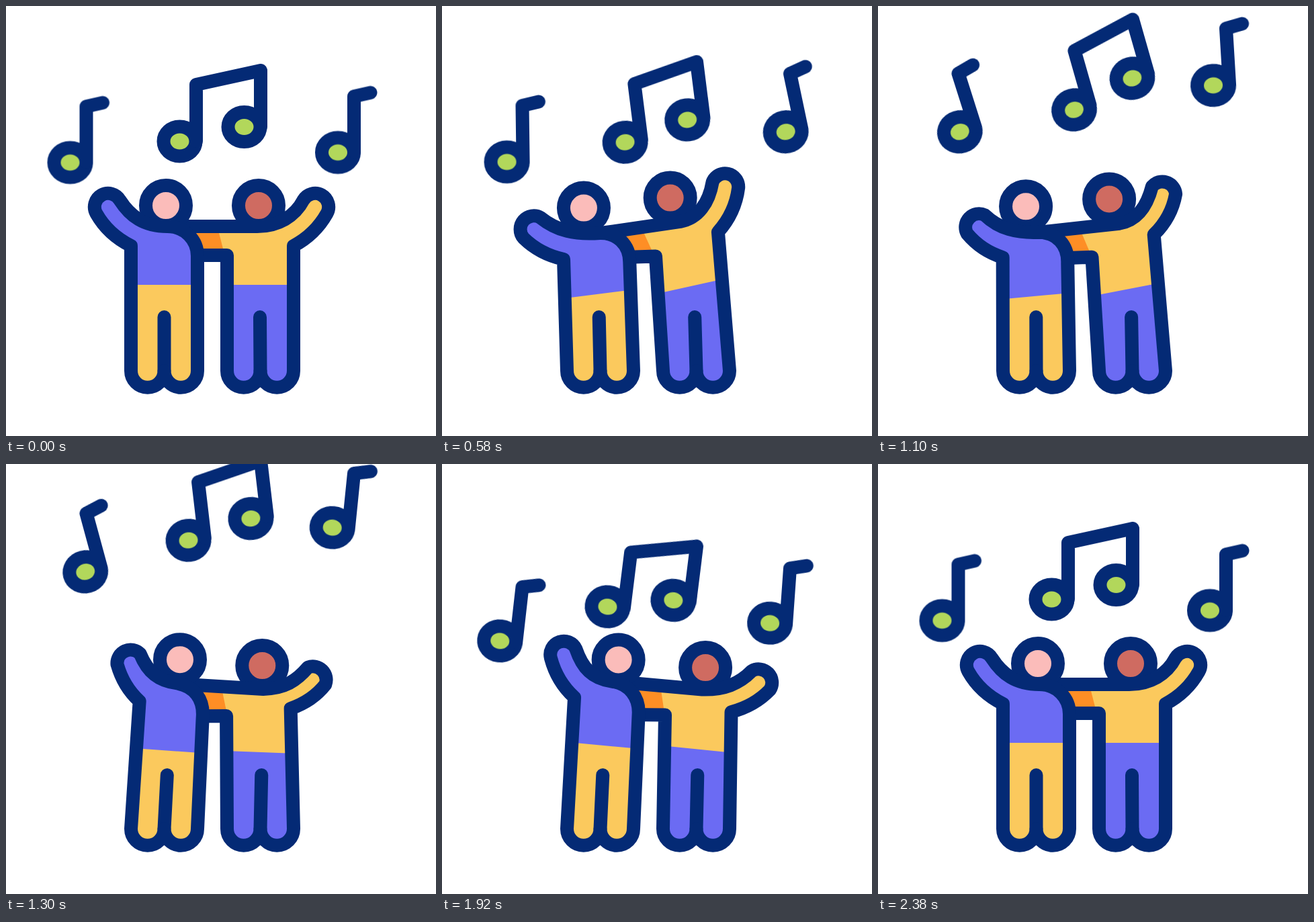
These frames come from a looping animation (640x640 px, 2.4 s). An HTML page:

```html
<!DOCTYPE html>
<html lang="en">
<head>
<meta charset="utf-8">
<title>Singing friends</title>
<style>
  html, body { margin: 0; width: 100%; height: 100%; overflow: hidden; background: #fff; }
  svg { display: block; width: 100%; height: 100%; }

  .line { fill: none; stroke: #042a75; stroke-width: 20; stroke-linecap: round; stroke-linejoin: round; }
  .purple { fill: #6b6bf3; }
  .yellow { fill: #fbc95d; }
  .orange { fill: #fe8e25; }
  .pink { fill: #fbbcba; }
  .brown { fill: #cf6b61; }
  .green { fill: #b2d75b; }

  .move { animation: 2.4s cubic-bezier(.3333, 0, .6667, 1) infinite; }

  /* People: rest, lean left, lean right, rest */
  .l-head { animation-name: l-head; }
  .l-body { animation-name: l-body; }
  .l-legs { animation-name: l-legs; }
  .l-gap  { animation-name: l-gap; }
  .r-head { animation-name: r-head; }
  .r-body { animation-name: r-body; }
  .r-legs { animation-name: r-legs; }
  .r-gap  { animation-name: r-gap; }
  .r-cuff { animation-name: r-cuff; }

  @keyframes l-head {
    0%, 95.8%, 100% { translate: 0 0; }
    37.5% { translate: -38px 5px; }
    64.4% { translate: 49px -11px; }
  }
  @keyframes l-body {
    0%, 95.8%, 100% { d: path("M186 543L186 357Q152 340 134.5 309A20 20 0 0 1 169.5 289C185 313 205 328 240 328C266 328 285 348 285 372L285 543A24.7 24.7 0 0 1 235.5 543A24.7 24.7 0 0 1 186 543Z"); }
    37.5% { d: path("M186 543L179 385Q143 381 116 360A20 20 0 0 1 138 326C165 343 195 346 233 342C258 341 277 358 277 385L285 543A24.7 24.7 0 0 1 235.5 543A24.7 24.7 0 0 1 186 543Z"); }
    64.4% { d: path("M186 543L208 338Q190 308 189 269A20 20 0 0 1 229 262C233 295 243 312 265 319C290 326 304 345 300 376L285 543A24.7 24.7 0 0 1 235.5 543A24.7 24.7 0 0 1 186 543Z"); }
  }
  @keyframes l-legs {
    0%, 95.8%, 100% { d: path("M186 415L285 415L285 543A24.7 24.7 0 0 1 235.5 543A24.7 24.7 0 0 1 186 543Z"); }
    37.5% { d: path("M182 443L278 426L285 543A24.7 24.7 0 0 1 235.5 543A24.7 24.7 0 0 1 186 543Z"); }
    64.4% { d: path("M200 414L294 432L285 543A24.7 24.7 0 0 1 235.5 543A24.7 24.7 0 0 1 186 543Z"); }
  }
  @keyframes l-gap {
    0%, 95.8%, 100% { d: path("M235.5 463L235.5 543"); }
    37.5% { d: path("M233 463L235.5 543"); }
    64.4% { d: path("M243 463L235.5 543"); }
  }
  @keyframes r-head {
    0%, 95.8%, 100% { translate: 0 0; }
    37.5% { translate: -51px -16px; }
    64.4% { translate: 32px 12px; }
  }
  @keyframes r-body {
    0%, 95.8%, 100% { d: path("M329 543L329 371L260 371L260 328L374 328C405 328 430 313 442.5 289A20 20 0 0 1 477.5 309Q460 340 428 357L428 543A24.7 24.7 0 0 1 378.5 543A24.7 24.7 0 0 1 329 543Z"); }
    37.5% { d: path("M329 543L313.5 373L255 376L235 341L347 318C372 311 384 285 386.5 251A20 20 0 0 1 426.5 255Q427 295 404 328L428 543A24.7 24.7 0 0 1 378.5 543A24.7 24.7 0 0 1 329 543Z"); }
    64.4% { d: path("M329 543L335 376L285 375L270 321L400 343C435 345 455 341 479.5 327A20 20 0 0 1 498.5 363Q470 380 433 381L428 543A24.7 24.7 0 0 1 378.5 543A24.7 24.7 0 0 1 329 543Z"); }
  }
  @keyframes r-legs {
    0%, 95.8%, 100% { d: path("M329 415L428 415L428 543A24.7 24.7 0 0 1 378.5 543A24.7 24.7 0 0 1 329 543Z"); }
    37.5% { d: path("M319 433L414 403L428 543A24.7 24.7 0 0 1 378.5 543A24.7 24.7 0 0 1 329 543Z"); }
    64.4% { d: path("M333 424L431 444L428 543A24.7 24.7 0 0 1 378.5 543A24.7 24.7 0 0 1 329 543Z"); }
  }
  @keyframes r-gap {
    0%, 95.8%, 100% { d: path("M378 463L378.5 543"); }
    37.5% { d: path("M375.5 463L378.5 543"); }
    64.4% { d: path("M382.5 463L378.5 543"); }
  }
  @keyframes r-cuff {
    0%, 95.8%, 100% { d: path("M260 328L314.5 328L325.5 371L260 371Z"); }
    37.5% { d: path("M235 341L289 329L313 374L255 376Z"); }
    64.4% { d: path("M270 321L335.6 333L337.4 376L285 375Z"); }
  }

  /* Notes: one copy sways up and goes, the next one drifts in from below */
  .l-out { animation-name: l-rise, l-sway, l-cut; }
  .c-out { animation-name: c-rise, c-sway, c-cut; }
  .r-out { animation-name: r-rise, r-sway, r-cut; }
  .l-in { animation-name: l-in; }
  .c-in { animation-name: c-in; }
  .r-in { animation-name: r-in; }

  @keyframes l-rise { 0%, 20.833% { translate: 0 0; } 80.833%, 100% { translate: 0 -130px; } }
  @keyframes c-rise { 0%, 12.5% { translate: 0 0; } 72.5%, 100% { translate: 0 -130px; } }
  @keyframes r-rise { 0%, 4.167% { translate: 0 0; } 64.167%, 100% { translate: 0 -130px; } }

  @keyframes l-sway { 0%, 20.833% { rotate: 0deg; } 48.333% { rotate: -18deg; } 78.333%, 100% { rotate: 10deg; } }
  @keyframes c-sway { 0%, 12.5% { rotate: 0deg; } 40% { rotate: -18.4deg; } 72.5%, 100% { rotate: 10.5deg; } }
  @keyframes r-sway { 0%, 4.167% { rotate: 0deg; } 31.667% { rotate: -14.5deg; } 61.667%, 100% { rotate: 9.5deg; } }

  @keyframes l-cut { 0%, 71.66% { opacity: 1; } 71.67%, 100% { opacity: 0; } }
  @keyframes c-cut { 0%, 66.66% { opacity: 1; } 66.67%, 100% { opacity: 0; } }
  @keyframes r-cut { 0%, 59.99% { opacity: 1; } 60%, 100% { opacity: 0; } }

  @keyframes l-in {
    0%, 66.66% { opacity: 0; translate: 0 52px; rotate: 10deg; }
    66.67% { opacity: 1; translate: 0 52px; rotate: 10deg; }
    100% { opacity: 1; translate: 0 0; rotate: 0deg; }
  }
  @keyframes c-in {
    0%, 61.66% { opacity: 0; translate: 0 50px; rotate: 13.3deg; }
    61.67% { opacity: 1; translate: 0 50px; rotate: 13.3deg; }
    100% { opacity: 1; translate: 0 0; rotate: 0deg; }
  }
  @keyframes r-in {
    0%, 54.99% { opacity: 0; translate: 0 50px; rotate: 9.8deg; }
    55% { opacity: 1; translate: 0 50px; rotate: 9.8deg; }
    100% { opacity: 1; translate: 0 0; rotate: 0deg; }
  }
</style>
</head>
<body>
<svg viewBox="0 0 640 640">
  <defs>
    <g id="bulb">
      <ellipse class="green" rx="24" ry="22"/>
      <ellipse class="line" rx="24" ry="22"/>
    </g>
    <g id="single">
      <use href="#bulb" x="-24" y="83.5"/>
      <path class="line" d="M0 83V0L24.5 -5.5"/>
    </g>
    <g id="pair">
      <use href="#bulb" x="-120.5" y="105.5"/>
      <use href="#bulb" x="-24.5" y="84"/>
      <path class="line" d="M-96 105V21L0 0V84"/>
    </g>
  </defs>

  <g class="move r-head">
    <circle class="brown" cx="376" cy="297" r="30"/>
    <circle class="line" cx="376" cy="297" r="30"/>
  </g>
  <path class="move r-body yellow"/>
  <path class="move r-cuff orange"/>
  <path class="move r-legs purple"/>
  <path class="move r-gap line"/>
  <path class="move r-body line"/>

  <g class="move l-head">
    <circle class="pink" cx="238" cy="297" r="30"/>
    <circle class="line" cx="238" cy="297" r="30"/>
  </g>
  <path class="move l-body purple"/>
  <path class="move l-legs yellow"/>
  <path class="move l-gap line"/>
  <path class="move l-body line"/>

  <g transform="translate(119.5 149.5)">
    <g class="move l-out"><use href="#single"/></g>
    <g class="move l-in"><use href="#single"/></g>
  </g>
  <g transform="translate(379 96)">
    <g class="move c-out"><use href="#pair"/></g>
    <g class="move c-in"><use href="#pair"/></g>
  </g>
  <g transform="translate(518 134.5)">
    <g class="move r-out"><use href="#single"/></g>
    <g class="move r-in"><use href="#single"/></g>
  </g>
</svg>
</body>
</html>
```
